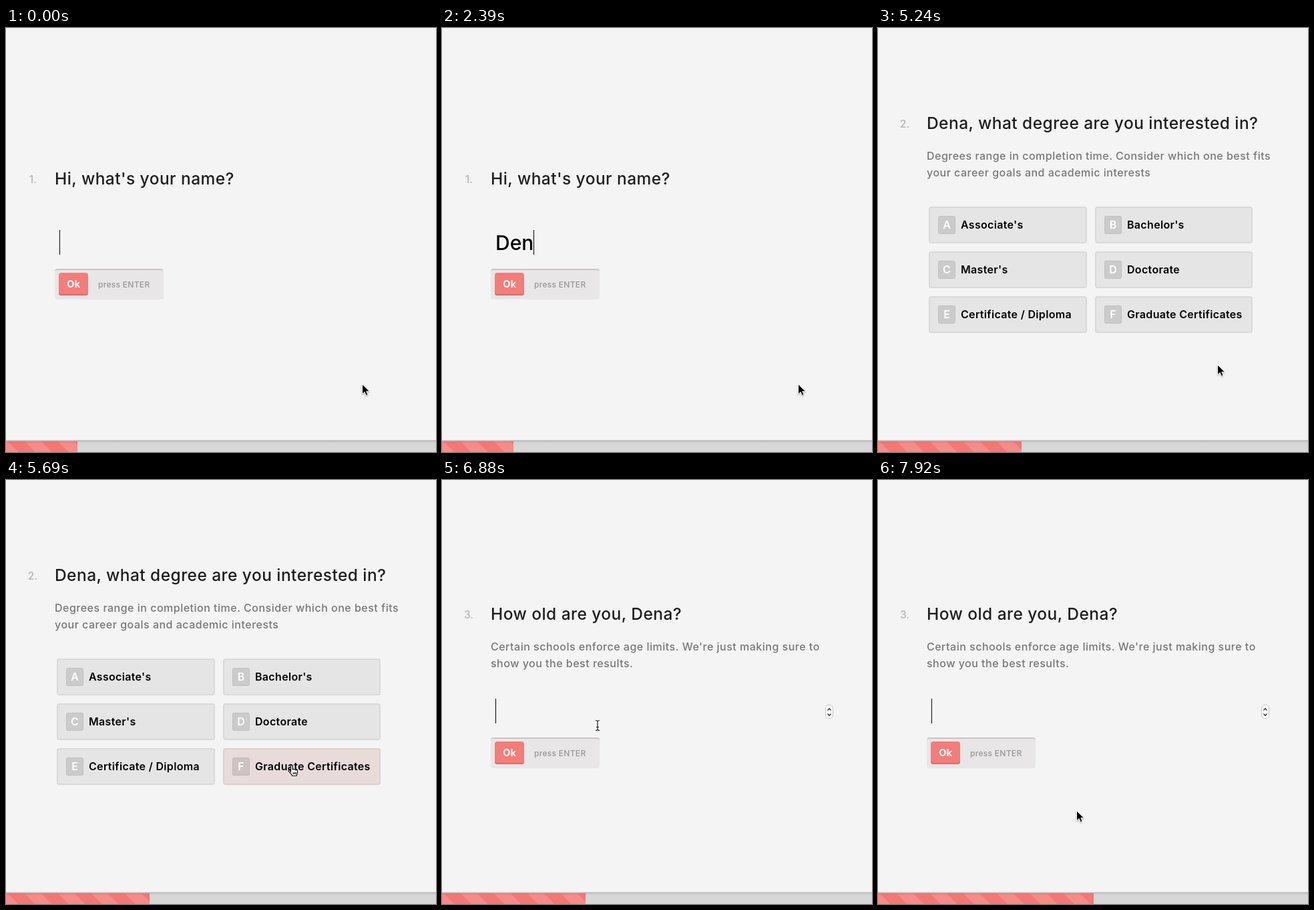
An HTML page that plays this animation: 644 by 634 pixels, repeating every 8 s.

```html
<!DOCTYPE html>
<html lang="en">
<head>
<meta charset="utf-8">
<title>Short survey</title>
<style>
  html, body { margin: 0; width: 100%; height: 100%; overflow: hidden; background: #f4f4f4; }
  body { position: relative; font: 500 16px Inter, "Open Sans", sans-serif; color: #1e1e1e; }
  div, svg { position: absolute; white-space: nowrap; }
  .stage { left: 0; top: 0; width: 644px; height: 634px; overflow: hidden; }
  .scene { inset: 0; }
  .anim, .scene, .caret, .typed span { animation: 8s step-end infinite; }

  .num { left: 0; width: 47px; text-align: right; top: 2px; font-size: 15.5px; color: #b4b4b4; line-height: 30px; }
  .title { left: 73px; top: 0; font-size: 24.5px; line-height: 30px; letter-spacing: .018em; }
  .desc { left: 73px; top: 52px; font-size: 16px; line-height: 25px; letter-spacing: .031em; color: #777; }
  .head { left: 0; }

  .typed { left: 80px; height: 38px; line-height: 38px; font-size: 30px; color: #000; }
  .typed span { font-size: 0; animation-name: key; animation-delay: var(--at); }
  .caret { display: inline-block; width: 1px; height: 37px; background: #000; vertical-align: top; }

  .panel { left: 73px; width: 163px; height: 46px; box-sizing: border-box; background: #e8e6e7;
           border-top: 2px solid #c7c5c6; border-radius: 4px; }
  .ok { left: 6px; top: 4px; width: 44px; height: 34px; line-height: 34px; text-align: center; font-size: 14.5px;
        font-weight: 700; color: #fff; background: #f47c79; border-radius: 4px; box-shadow: inset 0 -2px #d96d6b; }
  .hint { left: 65px; top: 5px; line-height: 34px; font-size: 12px; letter-spacing: .025em; color: #979596; }

  .opt { --fill: #e5e5e5; --edge: #d9d9d9; --hot: #e8dcdb; --hot-edge: #dccfce;
         width: 237px; height: 55px; box-sizing: border-box; border: 2px solid var(--edge); border-radius: 4px;
         background: var(--fill); color: #000; font-weight: 600; line-height: 51px; padding-left: 46px;
         letter-spacing: .02em; }
  .opt b { position: absolute; left: 12px; top: 12px; width: 26px; height: 27px; box-sizing: border-box;
           border: 1px solid #0000000d; border-radius: 3px; background: #0000001d; color: #fff; line-height: 25px;
           text-align: center; font-weight: 600; letter-spacing: 0; }
  .l { left: 76px; } .r { left: 325px; width: 236px; }
  .r1 { top: 267px; } .r2 { top: 334px; } .r3 { top: 401px; }

  .track { left: 0; right: 0; top: 616px; height: 18px; background: linear-gradient(#dedede, #b5b5b5 1px, #c6c6c6 2px, #d4d4d4 4px, #d7d7d7 6px); }
  .bar { left: 0; top: 2px; height: 16px; width: 107px; animation-name: grow;
         background: linear-gradient(#d8686680, #d8686600 3px),
           linear-gradient(45deg, #f48c89 25%, #f27875 25% 50%, #f48c89 50% 75%, #f27875 75%) -22px 0 / 50px 50px; }

  @keyframes key { 0% { font-size: 30px } 60%, 100% { font-size: 0 } }
  @keyframes ask1 { 0% { opacity: 1 } 48.625%, 100% { opacity: 0 } }
  @keyframes ask2 { 0% { opacity: 0 } 48.625% { opacity: 1 } 86%, 100% { opacity: 0 } }
  @keyframes ask3 { 0% { opacity: 0 } 86%, 100% { opacity: 1 } }
  @keyframes blink1 { 0%, 11.25%, 22.375% { opacity: 1 } 5.625%, 16.875%, 41.125%, 100% { opacity: 0 } }
  @keyframes blink3 { 0%, 97.25%, 100% { opacity: 1 } 91.625% { opacity: 0 } }
  @keyframes grow {
    0% { width: 107px } 50.5% { width: 139px } 52.375% { width: 194px } 54.25% { width: 215px }
    87.875% { width: 216px } 89.75% { width: 262px } 91.625% { width: 308px } 93.5%, 100% { width: 323px }
  }
  @keyframes hoverF {
    0%, 76.75%, 100% { background: var(--fill); border-color: var(--edge) }
    69.25% { background: var(--hot); border-color: var(--hot-edge) }
  }
  @keyframes hoverE {
    0%, 80.5%, 100% { background: var(--fill); border-color: var(--edge) }
    76.75% { background: var(--hot); border-color: var(--hot-edge) }
  }
  @keyframes hoverC {
    0%, 100% { background: var(--fill); border-color: var(--edge) }
    80.5% { background: var(--hot); border-color: var(--hot-edge) }
  }
  @keyframes move {
    0% { transform: translate(533px, 532px) }
    65.5% { transform: translate(508px, 503px) }
    67.375% { transform: translate(474px, 464px) }
    69.25% { transform: translate(440px, 436px) }
    71.125% { transform: translate(428px, 426px) }
    74.875% { transform: translate(392px, 418px) }
    76.75% { transform: translate(300px, 406px) }
    78.625% { transform: translate(256px, 389px) }
    80.5% { transform: translate(238px, 372px) }
    82.375% { transform: translate(233px, 367px) }
    93.5% { transform: translate(248px, 400px) }
    95.375% { transform: translate(278px, 456px) }
    97.25% { transform: translate(293px, 487px) }
    99%, 100% { transform: translate(297px, 494px) }
  }
  @keyframes arrow { 0%, 93.5%, 100% { opacity: 1 } 69.25% { opacity: 0 } }
  @keyframes hand { 0%, 86%, 100% { opacity: 0 } 69.25% { opacity: 1 } }
  @keyframes beam { 0%, 93.5%, 100% { opacity: 0 } 86% { opacity: 1 } }
</style>
</head>
<body>
<div class="stage">
  <div class="scene" style="animation-name:ask1">
    <div class="head" style="top:210px"><div class="num" style="width:46px">1.</div><div class="title">Hi, what's your name?</div></div>
    <div class="typed" style="top:302px"><span style="--at:1790ms">D</span><span style="--at:2090ms">e</span><span style="--at:2390ms">n</span><span style="--at:2840ms">a</span><i class="caret" style="animation-name:blink1"></i></div>
    <div class="panel" style="top:360px"><div class="ok">Ok</div><div class="hint">press ENTER</div></div>
  </div>

  <div class="scene" style="animation-name:ask2">
    <div class="head" style="top:127px"><div class="num">2.</div><div class="title">Dena, what degree are you interested in?</div>
      <div class="desc">Degrees range in completion time. Consider which one best fits<br>your career goals and academic interests</div></div>
    <div class="opt l r1"><b>A</b>Associate's</div>
    <div class="opt r r1"><b>B</b>Bachelor's</div>
    <div class="opt l r2 anim" style="animation-name:hoverC"><b>C</b>Master's</div>
    <div class="opt r r2"><b>D</b>Doctorate</div>
    <div class="opt l r3 anim" style="animation-name:hoverE"><b>E</b>Certificate / Diploma</div>
    <div class="opt r r3 anim" style="animation-name:hoverF"><b>F</b>Graduate Certificates</div>
  </div>

  <div class="scene" style="animation-name:ask3">
    <div class="head" style="top:185px"><div class="num">3.</div><div class="title">How old are you, Dena?</div>
      <div class="desc">Certain schools enforce age limits. We're just making sure to<br>show you the best results.</div></div>
    <div class="typed" style="top:327px"><i class="caret" style="animation-name:blink3"></i></div>
    <svg style="left:573px;top:335px" width="14" height="23" fill="none">
      <rect x="1.5" y="1.5" width="11" height="20" rx="4.5" fill="#fff" stroke="#c4c4c4"/>
      <path d="M4.5 9.5 7 6.5l2.5 3M4.5 14.5l2.5 3 2.5-3" stroke="#333" stroke-width="1.4"/>
    </svg>
    <div class="panel" style="top:385px"><div class="ok">Ok</div><div class="hint">press ENTER</div></div>
  </div>

  <div class="track"><div class="bar anim"></div></div>

  <svg class="anim" style="left:0;top:0;animation-name:move;overflow:visible" width="20" height="22">
    <path class="anim" style="animation-name:arrow;filter:drop-shadow(0 1px 1px #0005)" d="M.5.5v15.2l3.6-3.4 2.3 5.3 2.7-1.2-2.3-5.1h4.7z" stroke="#fff"/>
    <path class="anim" style="animation-name:hand" transform="translate(-6 0)" fill="#fff" stroke="#000" stroke-width="1.1" stroke-linejoin="round"
      d="M4.5 10.5V2c0-2 2.7-2 2.7 0v5c.3-1.2 2.4-1 2.5.3.5-1 2.4-.7 2.5.6.6-.8 2.3-.4 2.3 1.1v2.5c0 2-1.2 2.7-1.2 4.7H6.5c0-1.5-1.5-2.4-2.6-4L1.3 9.3c-1-1.5.8-2.5 1.8-1.3zM8.3 11v3M10.3 11v3M12.2 11v3"/>
    <path class="anim" style="animation-name:beam" fill="none" stroke="#222" stroke-width="1.2" d="M-3-7.5q3 0 3 2 0-2 3-2M0-6V6M-3 7.5q3 0 3-2 0 2 3 2M-2 2.5h4"/>
  </svg>
</div>
</body>
</html>
```
